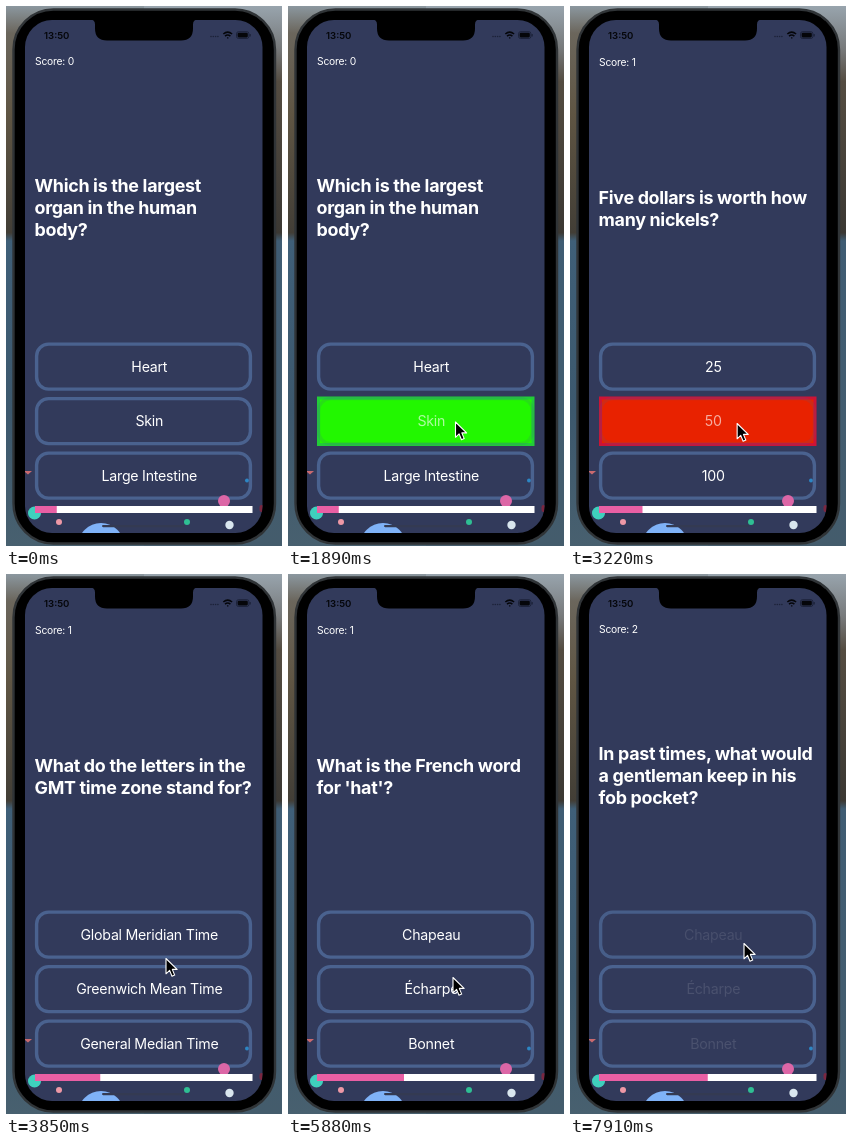
Recreate the animation shown at these times as an HTML page. Size 276x540 px, loop 8 s.

```html
<!DOCTYPE html>
<html lang="en">
<head>
<meta charset="utf-8">
<title>Quiz</title>
<style>
  html, body { margin: 0; width: 100%; height: 100%; overflow: hidden; background: #3f5a6f; }
  svg { display: block; width: 100vw; height: 100vh; }
  text { font-family: Inter, Roboto, sans-serif; fill: #fff; }
  .question { font-size: 17.9px; font-weight: 700; letter-spacing: -.32px; }
  .answer { font-size: 14.2px; letter-spacing: -.25px; text-anchor: middle; }
  .score { font-size: 10.3px; letter-spacing: -.22px; }
  .clock { font-size: 9.6px; font-weight: 600; fill: #05060a; }
</style>
</head>
<body>
<svg viewBox="0 0 276 540">
  <defs>
    <linearGradient id="left" x2="0" y2="1">
      <stop offset="0" stop-color="#8b979f"/>
      <stop offset=".05" stop-color="#6b665c"/>
      <stop offset=".2" stop-color="#5f5543"/>
      <stop offset=".42" stop-color="#423e36"/>
      <stop offset=".435" stop-color="#3f5f78"/>
      <stop offset=".75" stop-color="#3c586d"/>
      <stop offset="1" stop-color="#48606f"/>
    </linearGradient>
    <linearGradient id="right" x2="0" y2="1">
      <stop offset="0" stop-color="#98a4ad"/>
      <stop offset=".08" stop-color="#77797a"/>
      <stop offset=".14" stop-color="#544c41"/>
      <stop offset=".42" stop-color="#3b3833"/>
      <stop offset=".435" stop-color="#3f5c73"/>
      <stop offset="1" stop-color="#445c6c"/>
    </linearGradient>
    <clipPath id="screen"><rect x="19" y="14" width="237.5" height="513" rx="27"/></clipPath>
  </defs>

  <rect width="138" height="540" fill="url(#left)"/>
  <rect x="138" width="138" height="540" fill="url(#right)"/>

  <!-- phone body -->
  <rect x="7.5" y="3.5" width="261.5" height="534" rx="40" fill="#000" stroke="#303437" stroke-width="2.4"/>

  <g clip-path="url(#screen)">
    <rect x="19" y="14" width="238" height="513" fill="#323a5b"/>
    <path d="M18 465h8l-4 3.5z" fill="#c96a6f"/>
    <circle cx="241" cy="474.5" r="2" fill="#2c86c4"/>
    <rect x="253.5" y="499" width="4" height="7" rx="2" fill="#7b2740"/>
    <circle cx="28.5" cy="507" r="6.5" fill="#3fd0bd"/>
    <circle cx="53" cy="516" r="3" fill="#ee98a6"/>
    <circle cx="181" cy="516" r="3" fill="#2fbf93"/>
    <circle cx="223.5" cy="519" r="4.2" fill="#d9e6ee"/>
    <circle cx="95" cy="540" r="23" fill="#7fb2f7"/>
    <rect x="96" y="519" width="83" height="2.2" rx="1.1" fill="#343a52"/>
    <g id="buttons"></g>
    <circle cx="218" cy="495" r="6" fill="#dc66a6"/>
    <rect x="29" y="500" width="217.5" height="7" fill="#fff"/>
    <rect id="bar" x="29" y="500" height="7" fill="#e95fa4"/>
    <text id="score" class="score" x="29"></text>
    <g id="question"></g>
  </g>

  <!-- notch and status bar -->
  <path d="M84 13.5q5 0 5 5v4q0 12 12 12h74q12 0 12-12v-4q0-5 5-5z"/>
  <text class="clock" x="38" y="32.5">13:50</text>
  <g fill="#1c2238">
    <circle cx="205" cy="30.5" r=".8"/><circle cx="207.3" cy="30.5" r=".8"/>
    <circle cx="209.6" cy="30.5" r=".8"/><circle cx="211.9" cy="30.5" r=".8"/>
  </g>
  <g fill="none" stroke="#05060a" stroke-width="1.5">
    <path d="M217.3 28q4.4-3.8 8.8 0M219 30.2q2.7-2.2 5.4 0"/>
    <path d="M221.7 31.3v1.2"/>
  </g>
  <rect x="230.5" y="25.7" width="12.4" height="6.8" rx="2" fill="none" stroke="#151a2e" stroke-width=".7"/>
  <rect x="231.6" y="26.8" width="10.2" height="4.6" rx="1.1" fill="#05060a"/>
  <rect x="243.6" y="28" width="1" height="2.4" rx=".5" fill="#151a2e"/>

  <g id="cursor">
    <g id="ring" fill="none">
      <circle cx="1" cy="2.5" r="19.8" stroke="#fff" stroke-width="5.2"/>
      <circle cx="1" cy="2.5" r="19.8" stroke="#000" stroke-width="2.8"/>
    </g>
    <path d="M0 .5V15.8L3.6 12.4 6 18.2 8.7 17.1 6.3 11.4H11.1Z"
          fill="#000" stroke="#fff" stroke-width="1.1" stroke-linejoin="round"/>
  </g>
</svg>
<script>
const LOOP = 8000;
const RIGHT = { fill: '#22f700', edge: '#22cc38' };
const WRONG = { fill: '#e82200', edge: '#cc1436' };

const questions = [
  { lines: ['Which is the largest', 'organ in the human', 'body?'],
    answers: ['Heart', 'Skin', 'Large Intestine'], score: 0 },
  { lines: ['Five dollars is worth how', 'many nickels?'],
    answers: ['25', '50', '100'], score: 1 },
  { lines: ['What do the letters in the', 'GMT time zone stand for?'],
    answers: ['Global Meridian Time', 'Greenwich Mean Time', 'General Median Time'], score: 1 },
  { lines: ['What is the French word', "for 'hat'?"],
    answers: ['Chapeau', 'Écharpe', 'Bonnet'], score: 1 },
  { lines: ['In past times, what would', 'a gentleman keep in his', 'fob pocket?'],
    answers: ['', '', ''], score: 2 },
];

// ring shown, button dimmed, released; then the answer flashes
const taps = [
  { ring: 1470, dim: 1600, up: 1680, button: 1, result: RIGHT },
  { ring: 2870, dim: 2870, up: 3010, button: 1, result: WRONG },
  { ring: 4620, dim: 4620, up: 4900, button: 0, result: WRONG },
  { ring: 7420, dim: 7420, up: 7560, button: 0, result: RIGHT },
];
const SWITCH = 240, FADED_OUT = 365, FADED_IN = 690, UNDIM = 400;

// time, x, y of the pointer tip
const path = [
  [210, 207, 544], [450, 188, 502], [700, 164, 464], [980, 146, 439],
  [1290, 146, 439], [1470, 168, 414], [1680, 168, 414], [2100, 167, 417],
  [2450, 167, 417], [2730, 168, 417], [3300, 167, 417], [3780, 160, 387],
  [3850, 160, 384], [4060, 160, 384], [4550, 160, 366], [5150, 160, 366],
  [5600, 164, 400], [5880, 165, 403], [6020, 165, 403], [6400, 176, 412],
  [6650, 183, 417], [6720, 183, 417], [6790, 182, 409], [6860, 182, 409],
  [7070, 174, 369], [8000, 174, 369],
];

const $ = id => document.getElementById(id);
const progress = (t, a, b) => Math.min(1, Math.max(0, (t - a) / (b - a)));

function add(parent, tag, attrs) {
  const el = document.createElementNS('http://www.w3.org/2000/svg', tag);
  for (const k in attrs) el.setAttribute(k, attrs[k]);
  return parent.appendChild(el);
}

const buttons = [336.5, 391, 445.5].map(y => {
  const root = $('buttons');
  const flash = add(root, 'rect', { x: 30.5, y: y + 1, width: 214.5, height: 46.5, 'stroke-width': 3 });
  const face = add(root, 'g', {});
  const border = add(face, 'rect', { x: 30.6, y: y + 1.6, width: 213.8, height: 45, rx: 12,
    fill: 'none', stroke: '#4a628f', 'stroke-width': 3.4 });
  const label = add(face, 'text', { class: 'answer', x: 143.3, y: y + 29.2 });
  return { flash, face, border, label };
});

const lines = [0, 1, 2].map(() => add($('question'), 'text', { class: 'question', x: 28.6 }));

function pointer(t) {
  const i = path.findIndex(p => p[0] > t);
  if (i === 0) return path[0].slice(1);
  const [a, b] = [path[i - 1], path[i]];
  const k = progress(t, a[0], b[0]);
  return [a[1] + (b[1] - a[1]) * k, a[2] + (b[2] - a[2]) * k];
}

function showQuestion(index) {
  const { lines: words, score } = questions[index];
  const tall = words.length === 3;
  lines.forEach((el, i) => {
    el.textContent = words[i] || '';
    el.setAttribute('y', (tall ? 186.3 : 198.4) + i * 21.7);
  });
  $('score').textContent = 'Score: ' + score;
  $('score').setAttribute('y', tall ? 58.7 : 60);
  $('bar').setAttribute('width', 21.75 * (index + 1));
}

function labelState(t) {
  let index = 0, alpha = 1;
  for (const { up } of taps) {
    const dt = t - up;
    if (dt < SWITCH) break;
    if (dt < FADED_OUT) {
      alpha = 1 - progress(dt, SWITCH, FADED_OUT);
      break;
    }
    index++;
    alpha = progress(dt, FADED_OUT, FADED_IN);
  }
  return { index, alpha };
}

function render(t) {
  showQuestion(taps.filter(p => t >= p.up + SWITCH).length);

  const { index, alpha } = labelState(t);
  const tap = taps.filter(p => t >= p.ring).pop();
  buttons.forEach(({ flash, face, border, label }, i) => {
    const hit = tap && tap.button === i;
    const lit = hit && t >= tap.up && t < tap.up + SWITCH;
    const dimmed = hit && t >= tap.dim;
    flash.setAttribute('fill', lit ? tap.result.fill : 'none');
    flash.setAttribute('stroke', lit ? tap.result.edge : 'none');
    border.setAttribute('opacity', lit ? .25 : 1);
    face.setAttribute('opacity', dimmed ? .2 + .8 * progress(t, tap.up, tap.up + UNDIM) : 1);
    label.textContent = questions[index].answers[i];
    label.setAttribute('opacity', alpha);
  });

  $('cursor').setAttribute('transform', `translate(${pointer(t)})`);
  $('ring').setAttribute('visibility', tap && t < tap.up ? 'visible' : 'hidden');
}

const start = performance.now();
function tick() {
  render((performance.now() - start) % LOOP);
  requestAnimationFrame(tick);
}
tick();
</script>
</body>
</html>
```
